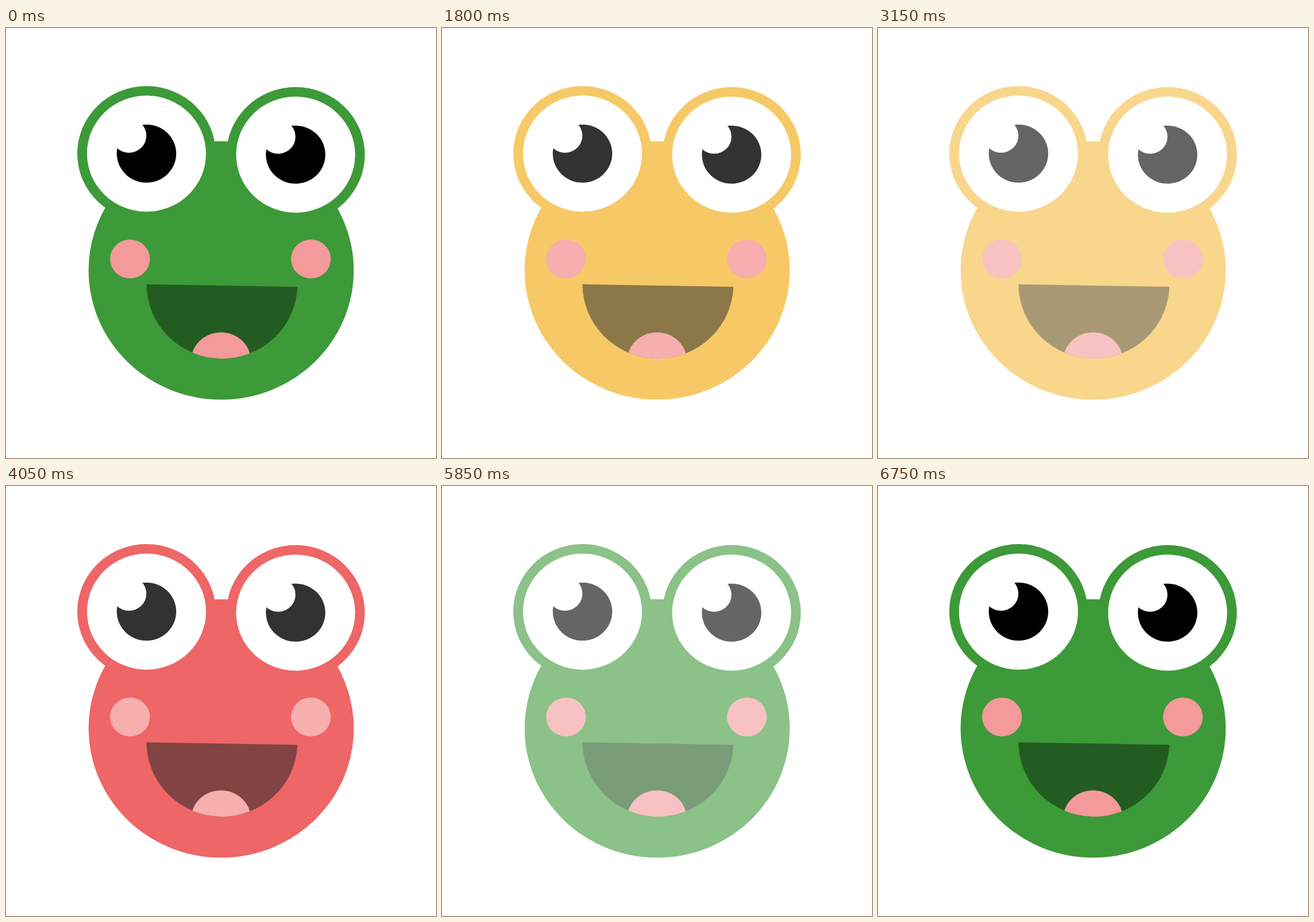
Recreate the animation shown at these times as an HTML page. Size 748 px wide and 748 px high, loop 7.2 s.

```html
<!DOCTYPE html>
<html lang="en">
<head>
<meta charset="utf-8">
<title>Frog</title>
<style>
  html, body { margin: 0; width: 100%; height: 100%; overflow: hidden; background: #fff; }
  svg { display: block; width: 100%; height: 100%; }
  .skin { fill: var(--skin); }
  .mouth { fill: var(--mouth); }
  .pink { fill: #f49a9a; }
  .white { fill: #fff; }
</style>
</head>
<body>
<svg viewBox="0 0 748 748">
  <defs>
    <path id="mouth" d="M244.3 445.8 A131.4 130 .96 0 0 507 450.2 Z"/>
    <clipPath id="inMouth"><use href="#mouth"/></clipPath>
    <g id="eye">
      <ellipse class="skin" rx="120.4" ry="117.5"/>
      <ellipse class="white" rx="103.5" ry="101"/>
      <ellipse rx="51.7" ry="50.5"/>
      <ellipse class="white" cx="-30.5" cy="-31.2" rx="30.3" ry="29.6"/>
    </g>
    <ellipse id="cheek" class="pink" cy="401.8" rx="34.6" ry="33.8"/>
  </defs>
  <g id="frog">
    <ellipse class="skin" cx="374.3" cy="421.7" rx="230.6" ry="224.8"/>
    <use href="#eye" x="244.4" y="218.5"/>
    <use href="#eye" x="503.8" y="220.3"/>
    <use href="#cheek" x="215.7"/>
    <use href="#cheek" x="530.4"/>
    <use href="#mouth" class="mouth"/>
    <g clip-path="url(#inMouth)">
      <ellipse class="pink" cx="374" cy="579" rx="52" ry="49.6"/>
    </g>
  </g>
</svg>
<script>
  const STEP = 450;
  const green = { skin: '#3d9a38', mouth: '#235c21' };
  const yellow = { skin: '#f4bc40', mouth: '#6f561b' };
  const red = { skin: '#ea4040', mouth: '#631515' };

  // Each phase holds one colour while the opacity steps out or in.
  const phases = [
    [green, [1, .8, .6]],
    [yellow, [.6, .8, 1, .8, .6]],
    [red, [.6, .8, 1, .8, .6]],
    [green, [.6, .8, 1]],
  ];
  const steps = phases.flatMap(([color, levels]) =>
    levels.map(opacity => ({ ...color, opacity })));

  const frog = document.getElementById('frog');

  function draw() {
    const { skin, mouth, opacity } = steps[Math.floor(performance.now() / STEP) % steps.length];
    frog.style.setProperty('--skin', skin);
    frog.style.setProperty('--mouth', mouth);
    frog.style.opacity = opacity;
    requestAnimationFrame(draw);
  }
  draw();
</script>
</body>
</html>
```
